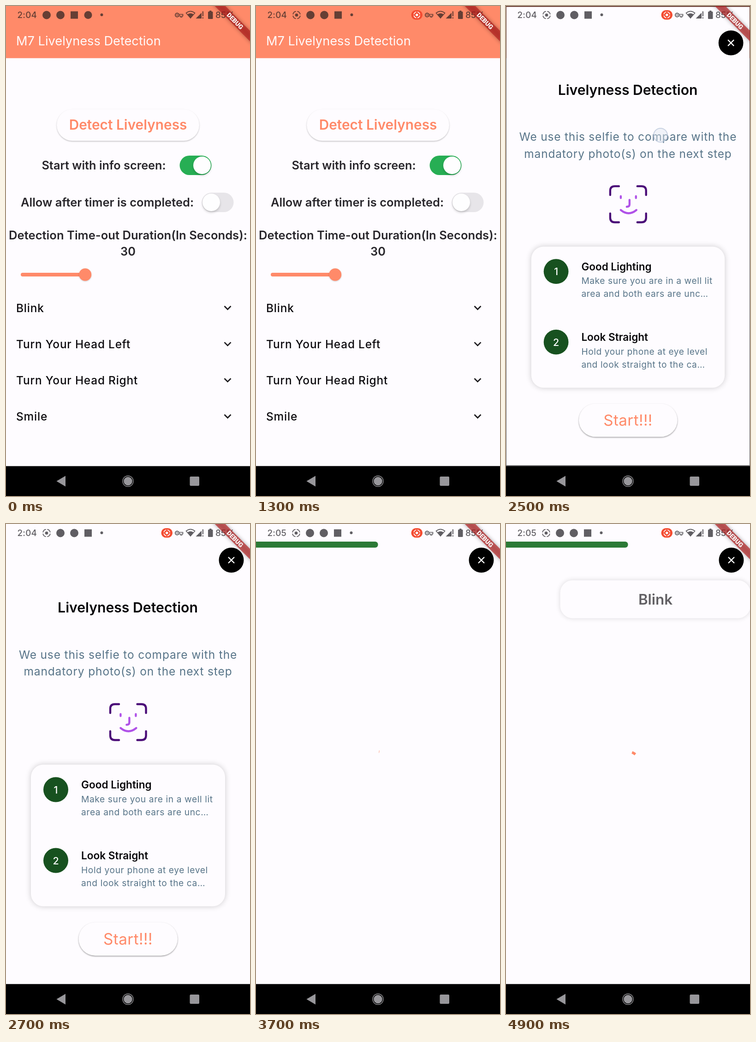
These frames come from a looping animation (529 by 1058 pixels, 5000 ms). An HTML page with a canvas:

```html
<!DOCTYPE html>
<html lang="en">
<head>
<meta charset="utf-8">
<title>Livelyness Detection</title>
<style>
html, body { margin: 0; width: 100%; height: 100%; overflow: hidden; background: #fefcff; }
canvas { display: block; width: 529px; height: 1058px; }
</style>
</head>
<body>
<canvas id="stage" width="529" height="1058"></canvas>
<script>
const W = 529, H = 1058, NAV_TOP = 993.5, LOOP = 5000, STEP = 100;
const PAPER = '#fefcff', CORAL = '#ff8a69', INK = '#28262b', SLATE = '#577488';
const ctx = document.getElementById('stage').getContext('2d');

const clamp = v => Math.max(0, Math.min(1, v));
const rad = deg => deg * Math.PI / 180;

function layer(draw, alpha = 1) {
  ctx.save();
  ctx.globalAlpha *= alpha;
  draw();
  ctx.restore();
}

function text(str, x, y, size, color, { weight = 400, align = 'left', spacing = 0, family = 'Inter' } = {}) {
  ctx.font = `${weight} ${size}px ${family}, sans-serif`;
  ctx.letterSpacing = spacing + 'px';
  ctx.textAlign = align;
  ctx.fillStyle = color;
  ctx.fillText(str, x, y);
}

function box(x, y, w, h, r, color) {
  ctx.beginPath();
  ctx.roundRect(x, y, w, h, r);
  ctx.fillStyle = color;
  ctx.fill();
}

function disc(x, y, r, color) {
  ctx.beginPath();
  ctx.arc(x, y, r, 0, 2 * Math.PI);
  ctx.fillStyle = color;
  ctx.fill();
}

function arc(x, y, r, from, to, width, color) {
  ctx.beginPath();
  ctx.arc(x, y, r, rad(from), rad(to));
  ctx.lineWidth = width;
  ctx.strokeStyle = color;
  ctx.stroke();
}

function stroke(path, width, color, cap = 'butt') {
  ctx.lineWidth = width;
  ctx.strokeStyle = color;
  ctx.lineCap = cap;
  ctx.stroke(new Path2D(path));
}

function fill(path, color) {
  ctx.fillStyle = color;
  ctx.fill(new Path2D(path));
}

function withShadow(color, blur, dy, draw) {
  layer(() => {
    ctx.shadowColor = color;
    ctx.shadowBlur = blur;
    ctx.shadowOffsetY = dy;
    draw();
  });
}

// Pill button with an optional touch ripple (age in ms)
function pill(x, y, w, h, shade, touch) {
  withShadow(`rgba(0,0,0,${shade})`, 3, 1.5, () => box(x, y, w, h, h / 2, PAPER));
  if (!touch || touch.age < 0) return;
  layer(() => {
    box(x, y, w, h, h / 2, '#fcf9fa');
    ctx.clip();
    const r = 30 + touch.age * 0.17;
    const glow = ctx.createRadialGradient(touch.x, touch.y, 0, touch.x, touch.y, r);
    glow.addColorStop(0, 'rgba(255,138,105,.14)');
    glow.addColorStop(0.6, 'rgba(255,138,105,.11)');
    glow.addColorStop(1, 'rgba(255,138,105,0)');
    ctx.fillStyle = glow;
    ctx.fillRect(x, y, w, h);
  });
}

function toggle(x, y, on) {
  box(x, y, 69, 42, 21, on ? '#27ae54' : '#e7e5e9');
  withShadow('rgba(0,0,0,.18)', 5, 3, () => disc(x + (on ? 48.5 : 20.5), y + 21, 19, '#fefeff'));
}

function homePage(t) {
  ctx.fillStyle = PAPER;
  ctx.fillRect(0, 0, W, NAV_TOP);
  ctx.fillStyle = CORAL;
  ctx.fillRect(0, 0, W, 112.6);
  text('M7 Livelyness Detection', 22, 85, 27.2, '#fffafa');

  pill(110, 223, 309, 68, 0.24, { x: 322, y: 268, age: t - 2300 });
  text('Detect Livelyness', 264.5, 266.5, 29.8, CORAL, { weight: 600, align: 'center' });

  const label = { weight: 600, align: 'center' };
  text('Start with info screen:', 212, 352.5, 25.3, INK, label);
  text('Allow after timer is completed:', 219.5, 432.5, 25.5, INK, label);
  text('Detection Time-out Duration(In Seconds):', 264.5, 503.5, 25.6, INK, label);
  text('30', 264.5, 539, 25.3, INK, label);
  toggle(376.5, 323, true);
  toggle(424.5, 403, false);

  stroke('M36 580H170', 8, CORAL, 'round');
  withShadow('rgba(0,0,0,.2)', 3, 1, () => disc(171.7, 580, 13.5, CORAL));

  ['Blink', 'Turn Your Head Left', 'Turn Your Head Right', 'Smile'].forEach((name, i) => {
    const y = 651.5 + i * 78.1;
    text(name, 22, y + 9, 24.4, '#0c0a0e', { weight: 500, spacing: 0.8 });
    stroke(`M473.5 ${y - 3.5}l7 7l7 -7`, 2.7, '#1c1a1e');
  });
}

function closeButton() {
  disc(488.5, 78, 27, '#000');
  stroke('M482 71.5l13 13m0 -13l-13 13', 2.3, '#fff');
}

function faceIcon(t) {
  const sway = Math.cos((t - 2500) / 700 * Math.PI);
  layer(() => {
    ctx.translate(264.8, 427.8);
    const half = 38.3 + 0.75 * sway;
    for (let i = 0; i < 4; i++) {
      stroke(`M${-half} ${-half + 19}v-9q0 -10 10 -10h9`, 4.4, '#4b0d78', 'round');
      ctx.rotate(Math.PI / 2);
    }
    ctx.translate(sway, -sway / 2);
    stroke('M-17 -17v4M16 -17v4M2 -9v10q0 5 -6 5M-17 13q17 14 34 0', 4.4, '#b052e8', 'round');
  });
}

function tip(number, y, title, lines) {
  disc(108, y, 27, '#17511f');
  text(number, 108, y + 8, 21.5, '#fff', { weight: 500, align: 'center' });
  text(title, 163, y - 2.5, 22.6, '#08070a', { weight: 600 });
  lines.forEach((line, i) => text(line, 163, y + 27 + i * 28.3, 19.2, SLATE, { spacing: 0.6 }));
}

function infoPage(t) {
  ctx.fillStyle = PAPER;
  ctx.fillRect(0, 0, W, NAV_TOP);
  closeButton();
  text('Livelyness Detection', 264, 191, 30.2, '#08070a', { weight: 600, align: 'center' });
  const intro = { align: 'center', spacing: 0.85 };
  text('We use this selfie to compare with the', 264.5, 290.5, 24.5, SLATE, intro);
  text('mandatory photo(s) on the next step', 264.5, 327, 24.5, SLATE, intro);
  faceIcon(t);
  withShadow('rgba(0,0,0,.2)', 13, 0, () => box(54, 519.5, 421, 306, 27, PAPER));
  tip('1', 573.5, 'Good Lighting', ['Make sure you are in a well lit', 'area and both ears are unc…']);
  tip('2', 726.5, 'Look Straight', ['Hold your phone at eye level', 'and look straight to the ca…']);
  pill(157.5, 860, 214.5, 72, 0.38, { x: 275, y: 896, age: t - 3400 });
  text('Start!!!', 264.5, 908, 33.3, CORAL, { align: 'center', spacing: 0.4 });
}

// Material "fast out, slow in" easing: cubic-bezier(.4, 0, .2, 1)
function fastOutSlowIn(x) {
  let lo = 0, hi = 1;
  for (let i = 0; i < 24; i++) {
    const s = (lo + hi) / 2, q = 1 - s;
    if (1.2 * q * q * s + 0.6 * q * s * s + s * s * s < x) lo = s; else hi = s;
  }
  return lo * lo * (3 - 2 * lo);
}

function spinner(age) {
  if (age < 0) return;
  const cycle = age / 1333 % 1;
  const head = 270 * fastOutSlowIn(clamp(cycle * 2));
  const tail = 270 * fastOutSlowIn(clamp(cycle * 2 - 1));
  const start = -93 + tail + 360 * age / 2222 + 90 * cycle;
  ctx.lineCap = 'butt';
  arc(264.5, 516, 24.5, start, start + Math.max(head - tail, 0.1), 5.4, CORAL);
}

function detectPage(t) {
  ctx.fillStyle = PAPER;
  ctx.fillRect(0, 0, W, NAV_TOP);
  box(0, 38, 264.5, 13, [0, 6, 6, 0], '#2b7a35');
  closeButton();
  spinner(t < 4800 ? t - 3665 : t - 4796);
  if (t < 4700) return;
  const shift = W * (1 - clamp((t - 4678) / 334)) ** 2;
  layer(() => {
    ctx.translate(shift, 0);
    withShadow('rgba(0,0,0,.14)', 11, 0, () => box(58, 121.5, 412.5, 82, 27, PAPER));
    text('Blink', 264.5, 174, 31.4, '#626064', { weight: 600, align: 'center' });
  });
}

function recordMark(x, y, size, width, color) {
  disc(x, y, size * 0.42, color);
  ctx.lineCap = 'butt';
  for (let a = 10; a < 370; a += 90) arc(x, y, size, a, a + 70, width, color);
}

function statusBar(t, tint) {
  const late = t >= 3600;
  text(late ? '2:05' : '2:04', 24.5, 26, 18.8, tint, { weight: 500, spacing: 0.2 });

  const p = clamp(t / 500), slide = p * p * (3 - 2 * p);
  const plain = r => x => disc(x, 19.5, r, tint);
  const icons = [x => recordMark(x, 19.5, 8, 1.8, tint), plain(9), plain(9),
    x => box(x - 8, 11.5, 16, 16, 0, tint), plain(8.5)];
  icons.forEach((icon, i) => {
    const alpha = i === 0 ? slide : i === 4 ? 1 - slide : 1;
    layer(() => icon(58 + 30 * (i + slide) - (late ? 1 : 0)), alpha);
  });
  disc(late ? 206.5 : 207.5, 19, 3, tint);

  layer(() => {
    box(336.5, 9, 24.5, 20.5, 10, '#f44c31');
    recordMark(348.7, 19.2, 6.5, 1.6, '#fff');
  }, slide);

  arc(371, 19.5, 4, 0, 360, 2, tint);
  disc(371, 19.5, 1.4, tint);
  stroke('M375 18h8.5v3.5h-2v2.5h-3v-2.5h-3.5', 1.6, tint);
  stroke('M390.5 15.2Q400 7.5 409.5 15.2L400 26Z', 1.6, tint);
  fill('M393.5 18Q400 13.5 406.5 18L400 26.5Z', tint);
  fill('M411.5 27L424 14.5V27ZM425.8 11.5h2.2v10.5h-2.2ZM425.8 24.5h2.2v2.5h-2.2Z', tint);
  box(438, 12, 10.5, 16, 1.5, tint);
  ctx.fillRect(441, 10, 4.5, 2.5);
  text('85%', 454, 26, 18.8, tint, { weight: 500 });
}

function debugBanner() {
  layer(() => {
    ctx.translate(W, 0);
    ctx.rotate(Math.PI / 4);
    withShadow('rgba(0,0,0,.5)', 8, 0, () => box(-62, 37.8, 124, 16.2, 0, 'rgba(183,28,28,.66)'));
    text('DEBUG', 0, 50.7, 13.7, '#fff', { weight: 900, align: 'center', family: 'Roboto' });
  });
}

function navBar() {
  ctx.fillStyle = '#000';
  ctx.fillRect(0, NAV_TOP, W, H - NAV_TOP);
  const gray = '#98979b';
  fill('M109.5 1026L129 1014.5V1037.5Z', gray);
  arc(264.5, 1026, 11.5, 0, 360, 1.4, gray);
  disc(264.5, 1026, 9.3, gray);
  box(398.5, 1016, 20.5, 20, 2, gray);
}

// The info page zooms in over a darkened home page
function openingPage(t) {
  homePage(0);
  ctx.fillStyle = 'rgba(0,0,0,.6)';
  ctx.fillRect(0, 0, W, NAV_TOP);
  layer(() => {
    ctx.translate(W / 2, NAV_TOP / 2);
    ctx.scale(0.9962, 0.9962);
    ctx.translate(-W / 2, -NAV_TOP / 2);
    infoPage(t);
  });
  disc(335, 279, 15, 'rgba(225,230,240,.45)');
  arc(335, 279, 15, 0, 360, 2, 'rgba(170,185,210,.6)');
}

function render(t) {
  if (t < 2500) homePage(t);
  else if (t < 2600) openingPage(t);
  else if (t < 3600) infoPage(t);
  else detectPage(t);
  statusBar(t, t < 2500 ? 'rgb(101,62,52)' : 'rgb(96,94,99)');
  debugBanner();
  navBar();
}

function tick(now) {
  render(Math.floor(now % LOOP / STEP) * STEP);
  requestAnimationFrame(tick);
}
requestAnimationFrame(tick);
</script>
</body>
</html>
```
